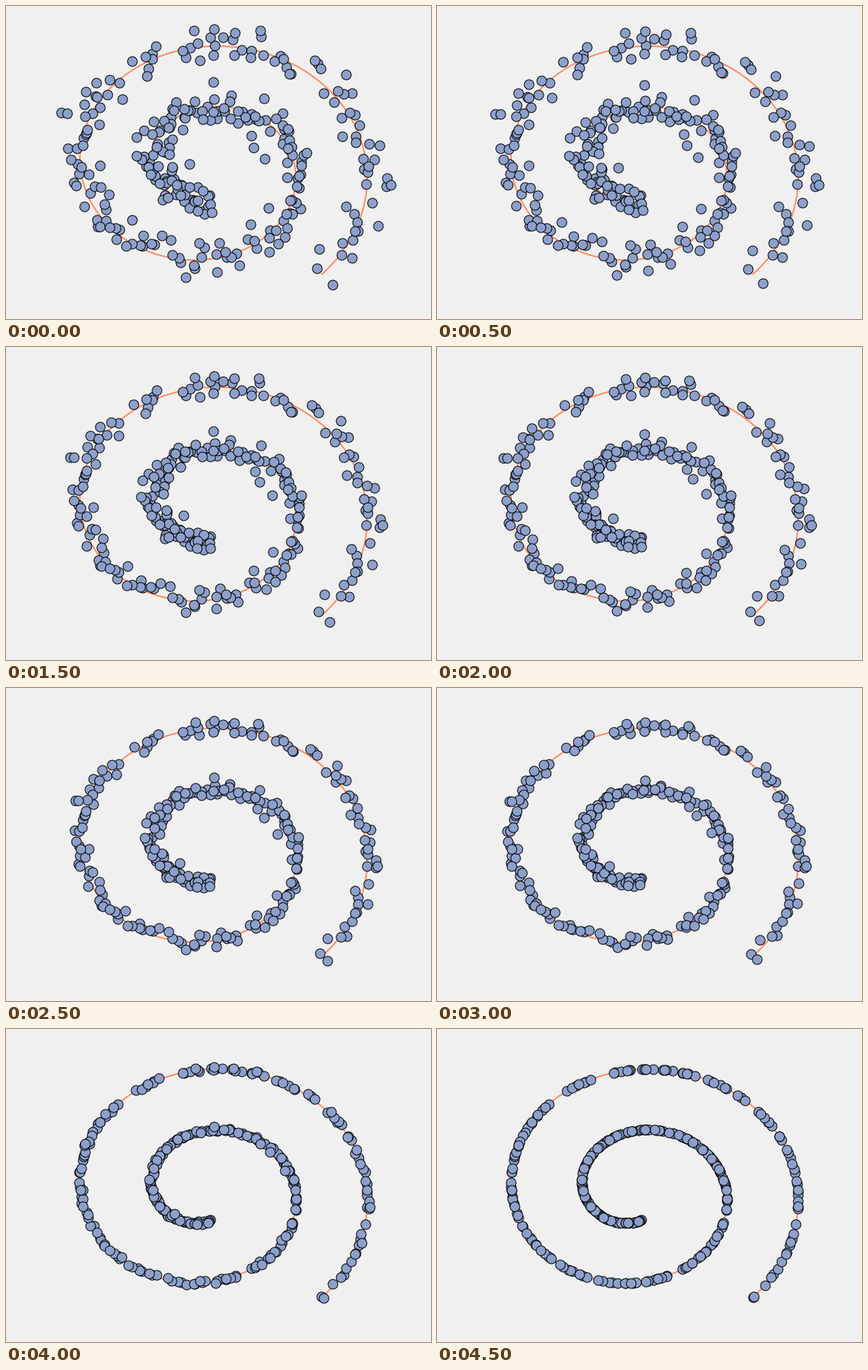
A matplotlib script that plays this animation: 570x420 px, repeating every 5000 ms.

```python
import numpy as np
import matplotlib.pyplot as plt
from matplotlib.animation import FuncAnimation

W, H, DPI = 570, 420, 100
PX = 72 / DPI
STEPS, STEP_MS = 10, 500
T_MIN, T_MAX = 3.0, 14.957
N_POINTS = 290
SPREAD, REACH = 12, 26

# Angles of the bare stretches along the spiral, and their half width
GAPS = np.array([8.2, 9.08, 9.83, 11.95, 12.28, 13.42, 14.32, 14.9])
GAP_HALF = 0.05

# A few loners that start far from the spiral
LONERS = np.array([(74, 143), (82, 144), (252, 33), (279, 31), (341, 33),
                   (456, 92), (511, 231), (516, 240), (438, 374), (278, 102),
                   (246, 212), (332, 190), (347, 205)], float)


def spiral(t):
    return np.column_stack((267.9 + 15.28 * t * np.sin(t),
                            217.7 - 13.0 * t * np.cos(t)))


def normal(t):
    dx = 15.28 * (np.sin(t) + t * np.cos(t))
    dy = -13.0 * (np.cos(t) - t * np.sin(t))
    return np.column_stack((-dy, dx)) / np.hypot(dx, dy)[:, None]


def nearest(points, curve):
    dist = np.linalg.norm(points[:, None] - curve[None], axis=2)
    return curve[dist.argmin(axis=1)]


def spread_angles(rng, n):
    """Evenly spread, jittered angles that keep out of the gaps."""
    t = np.linspace(T_MIN, T_MAX, 6000)
    free = t[np.abs(t[:, None] - GAPS).min(axis=1) > GAP_HALF]
    slots = (np.arange(n) + rng.uniform(-1, 1, n)) / (n - 1)
    picks = np.clip(slots, 0, 1) * (len(free) - 1)
    return rng.permutation(free[picks.astype(int)])


rng = np.random.default_rng(12)
curve = spiral(np.linspace(T_MIN, T_MAX, 2500))

angles = spread_angles(rng, N_POINTS)
offset = np.clip(rng.normal(0, SPREAD, N_POINTS), -REACH, REACH)
on_curve = spiral(angles)

home = np.vstack((on_curve, nearest(LONERS, curve)))
start = np.vstack((on_curve + offset[:, None] * normal(angles), LONERS))

fig = plt.figure(figsize=(W / DPI, H / DPI), dpi=DPI, facecolor="#f0f0f0")
ax = fig.add_axes([0, 0, 1, 1])
ax.set_xlim(0, W)
ax.set_ylim(H, 0)
ax.axis("off")

ax.plot(curve[:, 0], curve[:, 1], color="#fc8d62", lw=2 * PX, zorder=1)
dots = ax.scatter(start[:, 0], start[:, 1], s=(13 * PX) ** 2, c="#8da0cb",
                  edgecolors="black", linewidths=PX, zorder=2)


def update(i):
    k = i / (STEPS - 1)
    dots.set_offsets(start + k * (home - start))
    return dots,


anim = FuncAnimation(fig, update, frames=STEPS, interval=STEP_MS,
                     repeat=True, repeat_delay=0)
plt.show()
```
